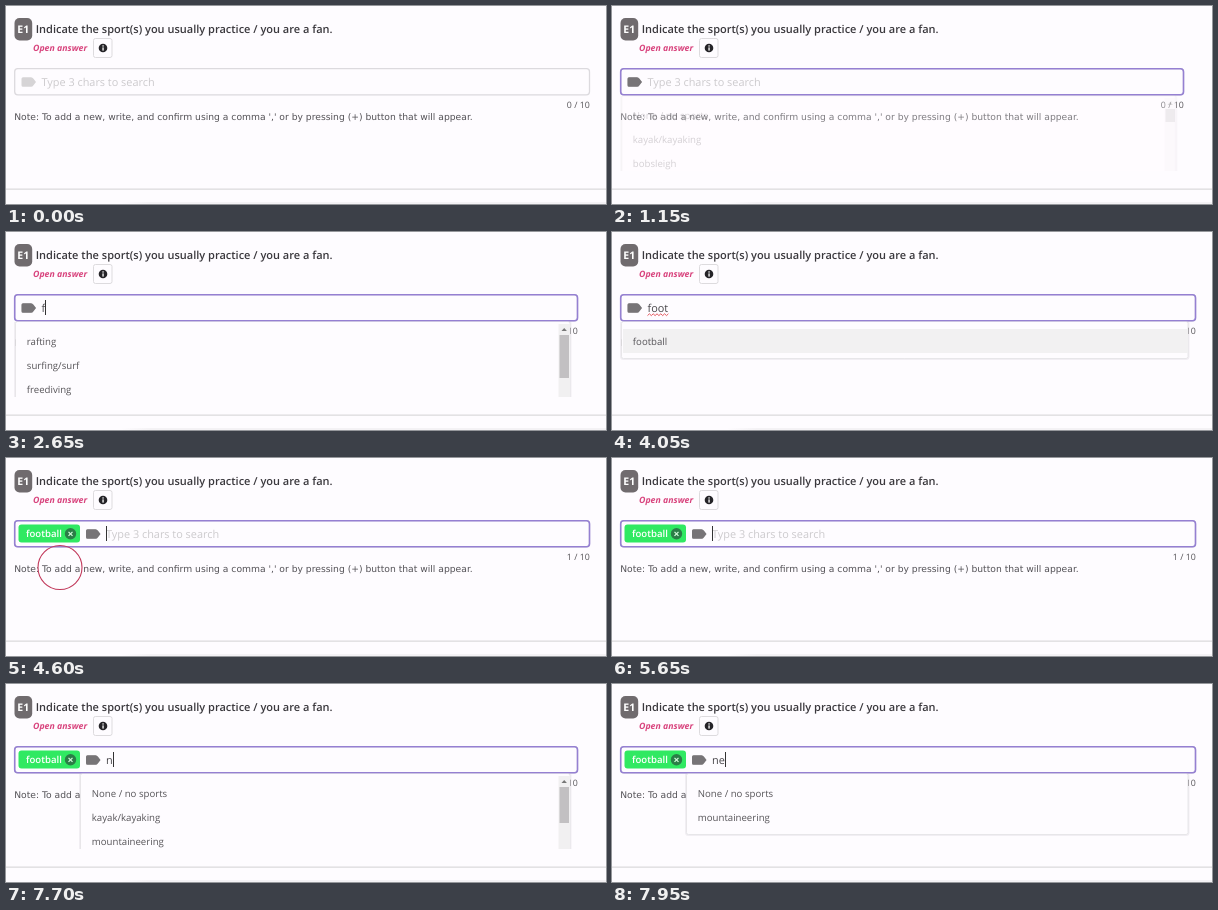
These frames come from a looping animation (600 by 198 pixels, 8000 ms). An HTML page with a canvas:

```html
<!DOCTYPE html>
<html lang="en">
<head>
<meta charset="utf-8">
<title>Tag field with suggestions</title>
<style>
  html, body { margin: 0; width: 100%; height: 100%; overflow: hidden; background: #fefcff; }
  canvas { display: block; }
</style>
</head>
<body>
<canvas id="stage" width="600" height="198"></canvas>
<script>
const ctx = document.getElementById('stage').getContext('2d');
const LOOP = 8000;
const SANS = '"Open Sans", "Noto Sans", sans-serif';
const WIDE = '"DejaVu Sans", sans-serif';
const PAGE = '#fefcff';
const INPUT_FONT = `10.9px ${SANS}`;
const PLACEHOLDER = 'Type 3 chars to search';

// Each track lists [start time, value]; the latest started entry applies.
const typedTrack = [[0, ''], [2500, 'f'], [2800, 'fo'], [2900, 'foo'], [3000, 'foot'],
  [4400, ''], [7500, 'n'], [7800, 'ne']];
const caretTrack = [[0, false], [200, true], [850, false], [1350, true], [1650, false],
  [2250, true], [3350, false], [4400, true], [5150, false], [5650, true],
  [6150, false], [6650, true], [7250, false], [7500, true]];
const listTrack = [
  [0, null],
  [1150, { items: ['None / no sports', 'kayak/kayaking', 'bobsleigh'], thumb: 13 }],
  [2600, { items: ['rafting', 'surfing/surf', 'freediving'], thumb: 43 }],
  [2950, { items: ['football'] }],
  [4350, null],
  [7600, { items: ['None / no sports', 'kayak/kayaking', 'mountaineering'], thumb: 36 }],
  [7900, { items: ['None / no sports', 'mountaineering'] }]
];
const clicks = [{ at: 0, x: 58, y: 76 }, { at: 4250, x: 54, y: 109.5 }];
const FOCUS_AT = 100, HOVER_AT = 4050, PICK_AT = 4400, SPELL_AT = 3050;

const current = (track, t) => track.filter(([start]) => start <= t).pop()[1];
const ramp = (t, from, to) => Math.min(1, Math.max(0, (t - from) / (to - from)));

function text(str, x, y, font, color, align = 'left') {
  ctx.font = font;
  ctx.fillStyle = color;
  ctx.textAlign = align;
  ctx.fillText(str, x, y);
}

function box(x, y, w, h, r, fill, stroke, line = 1) {
  ctx.beginPath();
  ctx.roundRect(x, y, w, h, r);
  if (fill) { ctx.fillStyle = fill; ctx.fill(); }
  if (stroke) { ctx.strokeStyle = stroke; ctx.lineWidth = line; ctx.stroke(); }
}

function disc(x, y, r, color) {
  ctx.fillStyle = color;
  ctx.beginPath();
  ctx.arc(x, y, r, 0, 7);
  ctx.fill();
}

function path(points, color, width) {
  ctx.beginPath();
  points.forEach(([x, y]) => ctx.lineTo(x, y));
  ctx.strokeStyle = color;
  ctx.lineWidth = width;
  ctx.stroke();
}

function drawPage() {
  ctx.fillStyle = PAGE;
  ctx.fillRect(0, 0, 600, 198);
  box(8.5, 12, 17.7, 22.5, 5, '#706b6e');
  text('E1', 17.3, 27, `700 10.5px ${SANS}`, '#fff', 'center');
  text('Indicate the sport(s) you usually practice / you are a fan.', 29.7, 27.3,
    `600 11px ${SANS}`, '#3a383d');
  text('Open answer', 27, 45.2, `italic 700 8.75px ${SANS}`, '#d8437d');
  box(87.5, 32.5, 18.5, 19, 2, PAGE, '#dddbde');
  disc(97, 42, 4.3, '#252428');
  ctx.fillStyle = '#fff';
  ctx.fillRect(96.4, 39.3, 1.3, 1.3);
  ctx.fillRect(96.4, 41.4, 1.3, 3.2);
  text("Note: To add a new, write, and confirm using a comma ',' or by pressing (+) button that will appear.",
    8.2, 114.2, `9.2px ${WIDE}`, '#545257');
  ctx.fillStyle = '#dddcde';
  ctx.fillRect(0, 182.5, 600, 1.3);
  const fade = ctx.createLinearGradient(115, 0, 145, 0);
  fade.addColorStop(0, PAGE);
  fade.addColorStop(1, '#f4f2f5');
  ctx.fillStyle = fade;
  ctx.fillRect(115, 196, 485, 2);
}

function drawLabelIcon(x, color) {
  ctx.fillStyle = color;
  ctx.beginPath();
  ctx.moveTo(x + 1.5, 71.2);
  ctx.lineTo(x + 9.5, 71.2);
  ctx.quadraticCurveTo(x + 11, 71.2, x + 12, 72.8);
  ctx.lineTo(x + 14.5, 76);
  ctx.lineTo(x + 12, 79.2);
  ctx.quadraticCurveTo(x + 11, 80.8, x + 9.5, 80.8);
  ctx.lineTo(x + 1.5, 80.8);
  ctx.quadraticCurveTo(x, 80.8, x, 79.3);
  ctx.lineTo(x, 72.7);
  ctx.quadraticCurveTo(x, 71.2, x + 1.5, 71.2);
  ctx.fill();
}

function drawChip() {
  box(12.5, 66.5, 61.5, 18, 3, '#30e962');
  text('football', 20, 79.4, `600 9.6px ${SANS}`, '#fff');
  disc(64.5, 75.8, 5.7, '#2b7d47');
  path([[62.5, 73.8], [66.5, 77.8]], '#d2fbdc', 1.2);
  path([[66.5, 73.8], [62.5, 77.8]], '#d2fbdc', 1.2);
}

function drawField(t, right, picked) {
  const focus = ramp(t, FOCUS_AT, FOCUS_AT + 200);
  const shift = picked ? 64.5 : 0;
  const typed = current(typedTrack, t);
  const x = 35.5 + shift;

  box(8.7, 62.7, right - 9.2, 26.1, 3, PAGE, '#dcdade', 1.3);
  drawLabelIcon(15.5 + shift, '#d6d4d6');
  ctx.globalAlpha = focus;
  box(8.7, 62.7, right - 9.2, 26.1, 3, null, '#9580d2', 1.6);
  drawLabelIcon(15.5 + shift, '#777477');
  ctx.globalAlpha = 1;
  if (picked) drawChip();

  text(typed || PLACEHOLDER, x, 80, INPUT_FONT, typed ? '#48464a' : '#cccacd');
  const width = typed ? ctx.measureText(typed).width : 0;
  if (typed === 'foot' && t >= SPELL_AT) {
    const zigzag = Array.from({ length: 12 }, (_, i) => [x + i * 1.9, i % 2 ? 81.8 : 83.6]);
    path(zigzag, '#e0484e', 0.9);
  }
  if (current(caretTrack, t)) {
    ctx.fillStyle = '#333';
    ctx.fillRect(Math.round(x + width), 68, 1, 15);
  }
  text(`${picked ? 1 : 0} / 10`, right - 0.3, 101.8, `8.8px ${SANS}`, '#555357', 'right');
}

function drawScrollbar(right, thumb) {
  const x = right - 12;
  ctx.fillStyle = '#f1f0f1';
  ctx.fillRect(x, 92, 11.5, 73);
  ctx.fillStyle = '#c2c0c2';
  ctx.fillRect(x + 1, 103, 9.5, thumb);
  ctx.fillStyle = '#777';
  ctx.beginPath();
  ctx.moveTo(x + 3, 99);
  ctx.lineTo(x + 5.7, 96);
  ctx.lineTo(x + 8.4, 99);
  ctx.fill();
}

function drawList({ items, thumb }, t, left, right) {
  const bottom = thumb ? 185 : 103 + 24 * items.length;
  const frame = [left + 0.5, 89.5, right - left - 1, bottom - 90, 2];
  ctx.save();
  ctx.beginPath();
  ctx.rect(0, 89.8, 600, 75.2);
  ctx.clip();
  ctx.globalAlpha = t < 2000 ? ramp(t, 1100, 1300) : 1;
  box(...frame, null, 'rgba(40, 30, 50, 0.06)', 3);
  box(...frame, PAGE, '#e4e2e5', 0.8);
  if (t >= HOVER_AT && t < PICK_AT) {
    ctx.fillStyle = '#f2f1f2';
    ctx.fillRect(left + 2, 97, right - left - 2.5, 24);
  }
  items.forEach((item, i) =>
    text(item, left + 11.8, 112.7 + 24 * i, `9.65px ${SANS}`, '#565458'));
  if (thumb) drawScrollbar(right, thumb);
  ctx.restore();
}

function drawClick({ at, x, y }, t) {
  const age = t - at;
  if (age < 50 || age >= 400) return;
  ctx.beginPath();
  ctx.arc(x, y, 22 * ramp(age, 0, 350), 0, 7);
  ctx.strokeStyle = '#c23a5c';
  ctx.lineWidth = 1.1;
  ctx.stroke();
}

function draw(t) {
  const list = current(listTrack, t);
  const picked = t >= PICK_AT;
  // A long list makes the form scroll, which narrows the field.
  const right = list && list.thumb ? 572 : 584;
  drawPage();
  drawField(t, right, picked);
  if (list) drawList(list, t, picked ? 74 : 9, right - 7.5);
  clicks.forEach(click => drawClick(click, t));
}

ctx.textRendering = 'geometricPrecision';
const begin = performance.now();
function tick() {
  draw((performance.now() - begin) % LOOP);
  requestAnimationFrame(tick);
}
tick();
</script>
</body>
</html>
```
